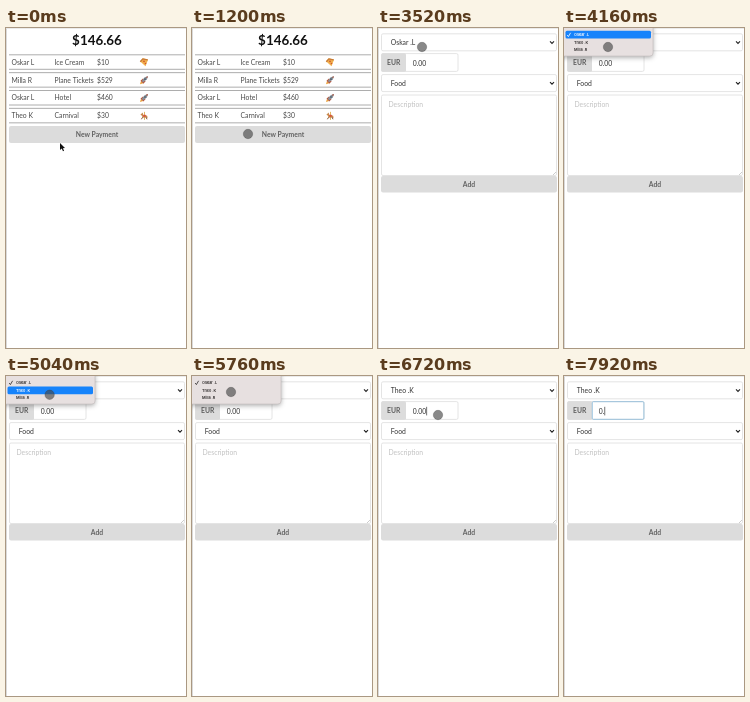
An HTML page with a canvas that plays this animation: 180x320 px, repeating every 8 s.

```html
<!DOCTYPE html>
<html lang="en">
<head>
<meta charset="utf-8">
<title>Payments</title>
<style>
html, body { margin: 0; width: 100%; height: 100%; overflow: hidden; background: #fff; }
canvas { display: block; width: 180px; height: 320px; }
</style>
</head>
<body>
<canvas id="stage"></canvas>
<script>
const W = 180, H = 320, LOOP = 8000, STEP = 80;
const canvas = document.getElementById('stage');
const ctx = canvas.getContext('2d');
const ratio = window.devicePixelRatio || 1;
canvas.width = W * ratio;
canvas.height = H * ratio;

const LATO = 'Lato, sans-serif';
const INK = '#484848', LINE = '#dedede', GREY = '#dcdcdc';
const people = ['Oskar .L', 'Theo .K', 'Milla .R'];
const payments = [
  ['Oskar L', 'Ice Cream', '$10', pizza],
  ['Milla R', 'Plane Tickets', '$529', rocket],
  ['Oskar L', 'Hotel', '$460', rocket],
  ['Theo K', 'Carnival', '$30', carousel]
];
// time, x, y
const pointerPath = [
  [0, 54, 115], [160, 55, 112], [480, 55, 112], [1200, 56, 106],
  [2080, 56, 106], [2160, 56, 105], [2400, 58, 95], [2960, 58, 95],
  [3520, 44, 19], [4960, 44, 19], [5440, 39, 16], [6000, 39, 16], [6480, 60, 39]
];

const clamp = v => Math.max(0, Math.min(1, v));
const ramp = (t, from, to) => clamp((t - from) / (to - from));
const smooth = p => p * p * (3 - 2 * p);

function pointerAt(t) {
  const next = pointerPath.findIndex(k => k[0] > t);
  if (next < 0) return pointerPath[pointerPath.length - 1].slice(1);
  const a = pointerPath[next - 1], b = pointerPath[next];
  const p = smooth(ramp(t, a[0], b[0]));
  return [a[1] + (b[1] - a[1]) * p, a[2] + (b[2] - a[2]) * p];
}

function text(str, x, y, { size = 6.8, weight = 400, color = INK, align = 'left', family = LATO } = {}) {
  ctx.font = `${weight} ${size}px ${family}`;
  ctx.fillStyle = color;
  ctx.textAlign = align;
  ctx.fillText(str, x, y);
}

function rect(x, y, w, h, fill, stroke, r = 1.5) {
  ctx.beginPath();
  ctx.roundRect(x, y, w, h, r);
  if (fill) { ctx.fillStyle = fill; ctx.fill(); }
  if (stroke) { ctx.strokeStyle = stroke; ctx.lineWidth = 0.8; ctx.stroke(); }
}

function shape(points, fill) {
  ctx.beginPath();
  points.forEach(([x, y]) => ctx.lineTo(x, y));
  ctx.closePath();
  ctx.fillStyle = fill;
  ctx.fill();
}

function stroke(points, color, width) {
  ctx.beginPath();
  points.forEach(([x, y]) => ctx.lineTo(x, y));
  ctx.strokeStyle = color;
  ctx.lineWidth = width;
  ctx.stroke();
}

function dot(x, y, r, fill) {
  ctx.beginPath();
  ctx.arc(x, y, r, 0, Math.PI * 2);
  ctx.fillStyle = fill;
  ctx.fill();
}

// Icons are drawn around their own centre.
function pizza() {
  shape([[-4, -1], [-1, -4], [4, -2.5], [1.5, 4]], '#f0b04c');
  stroke([[-3.7, -0.6], [-1.2, -3.4], [3.8, -2.4]], '#c77a35', 1.4);
  dot(0, -1, 0.9, '#d2552f');
  dot(1.5, 1.2, 0.8, '#d2552f');
}

function rocket() {
  shape([[-4, 4], [-3, 0.8], [-0.8, 3]], '#e9a23b');
  shape([[-3.5, 0.6], [-1, -1.6], [1.6, 1], [-0.6, 3.5]], '#b4553c');
  shape([[-2.2, 0.8], [0.6, -2.8], [4, -4], [2.8, -0.6], [-0.8, 2.2]], '#8a929b');
  shape([[1.8, -3.2], [4, -4], [3.2, -1.8]], '#a9543f');
  dot(1, -1, 0.8, '#3f5261');
}

function carousel() {
  stroke([[0.5, -4], [0.5, 4]], '#d8a53c', 0.8);
  shape([[-3.6, -1.2], [-1.4, -3.4], [-0.5, -0.4], [3, -0.4], [3.8, 2], [1.8, 1.6], [-1.4, 1.8], [-2, 0]], '#c98a4c');
  stroke([[-1.4, 1.4], [-2.6, 3.4]], '#8a5732', 1);
  stroke([[2, 1.2], [3, 3.4]], '#8a5732', 1);
  rect(-0.8, -1, 2.6, 1.8, '#d6533c', null, 0.4);
}

function button(label, y, h) {
  rect(3, y, 176, h, GREY, null, 2);
  text(label, 91, y + h / 2 + 2.4, { weight: 700, color: '#626262', align: 'center' });
}

function listPage() {
  text('$146.66', 91, 16.8, { size: 13.4, weight: 700, color: '#111', align: 'center' });
  payments.forEach(([who, what, amount, icon], i) => {
    const top = 26.8 + i * 17.85;
    stroke([[3, top], [179, top]], '#999', 0.8);
    stroke([[3, top + 14.5], [179, top + 14.5]], '#999', 0.8);
    const base = top + 9.9;
    text(who, 5.5, base);
    text(what, 48.5, base);
    text(amount, 91, base);
    ctx.save();
    ctx.translate(138, top + 7.5);
    icon();
    ctx.restore();
  });
  button('New Payment', 98, 17);
}

function select(value, y) {
  rect(3.5, y, 175, 17, '#fff', LINE);
  text(value, 12.8, y + 10.9, { color: '#333' });
  const cy = y + 8.5;
  stroke([[172, cy - 1], [174, cy + 1.1], [176, cy - 1]], '#222', 1.1);
}

function formPage(t) {
  select(t < 5920 ? people[0] : people[1], 5.8);
  amountField(t);
  select('Food', 46.6);
  rect(3.5, 67, 175, 80.5, '#fff', LINE);
  text('Description', 10.5, 78.6, { color: '#c2c2c2' });
  stroke([[175, 147], [178, 144]], '#999', 0.5);
  button('Add', 148, 16.5);
}

function amountField(t) {
  rect(3.5, 25.6, 76.5, 17.8, '#fff', LINE);
  rect(3.2, 25.3, 24.8, 18.4, GREY, null, 1.5);
  text('EUR', 9, 36.6, { weight: 700, color: '#606060' });
  const focus = ramp(t, 6720, 6960);
  if (focus) {
    ctx.globalAlpha = focus;
    rect(28.3, 25.7, 51.6, 17.6, null, '#85b7d9', 1);
    ctx.globalAlpha = 1;
  }
  const value = t < 7360 ? '0.00' : t < 7600 ? '0.0' : '0.';
  text(value, 34.8, 37.7, { color: '#333' });
  if (t >= 6720) {
    const x = 35.2 + ctx.measureText(value).width;
    stroke([[x, 30.8], [x, 39.4]], '#333', 0.7);
  }
}

function popup(t) {
  if (t < 3760 || t >= 6160) return;
  ctx.save();
  ctx.globalAlpha = 1 - ramp(t, 5840, 6160);
  ctx.shadowColor = 'rgba(0,0,0,.35)';
  ctx.shadowBlur = 5 * ratio;
  ctx.shadowOffsetY = 1.5 * ratio;
  rect(-3, -3, 92, 31, '#e7e0e0', null, 3);
  ctx.shadowColor = 'transparent';
  rect(-3, -3, 92, 31, null, '#c9c3c3', 3);
  const active = t < 5040 ? 0 : t >= 5760 && t < 5840 ? -1 : 1;
  const rowY = i => 6.7 + i * 7.6;
  if (active >= 0) rect(1.5, rowY(active) - 3.9, 85.5, 7.8, '#1683fb', null, 1.5);
  const tone = i => i === active ? '#fff' : '#2d2929';
  people.forEach((name, i) => {
    text(name, 10, rowY(i) + 1.3, { size: 3.8, weight: 600, color: tone(i), family: 'Inter, sans-serif' });
  });
  stroke([[3.2, 7], [4.4, 8.6], [6.6, 4.8]], tone(0), 0.8);
  ctx.restore();
}

function pointer(t) {
  if (t >= 7360) return;
  const [x, y] = pointerAt(t);
  if (t < 80) {
    const arrow = [[0, 0], [0, 7], [1.7, 5.5], [3, 8.3], [4.1, 7.8], [2.9, 5.2], [5, 5]]
      .map(([dx, dy]) => [x + dx, y + dy]);
    stroke([...arrow, arrow[0]], '#fff', 1.2);
    shape(arrow, '#111');
    return;
  }
  dot(x, y, 4.7, 'rgba(70,70,70,.64)');
  ctx.strokeStyle = 'rgba(60,60,60,.45)';
  ctx.lineWidth = 0.7;
  ctx.stroke();
}

function draw(t) {
  ctx.setTransform(ratio, 0, 0, ratio, 0, 0);
  ctx.fillStyle = '#fff';
  ctx.fillRect(0, 0, W, H);
  ctx.fillStyle = '#dadada';
  ctx.fillRect(0, 0, 1, H);
  ctx.fillStyle = '#e6e6e6';
  ctx.fillRect(0, 0, W, 0.8);
  if (t < 1360) listPage();
  else formPage(t);
  popup(t);
  pointer(t);
}

const start = performance.now();
function tick() {
  const t = (performance.now() - start) % LOOP;
  draw(Math.floor(t / STEP) * STEP);
  requestAnimationFrame(tick);
}
tick();
</script>
</body>
</html>
```
